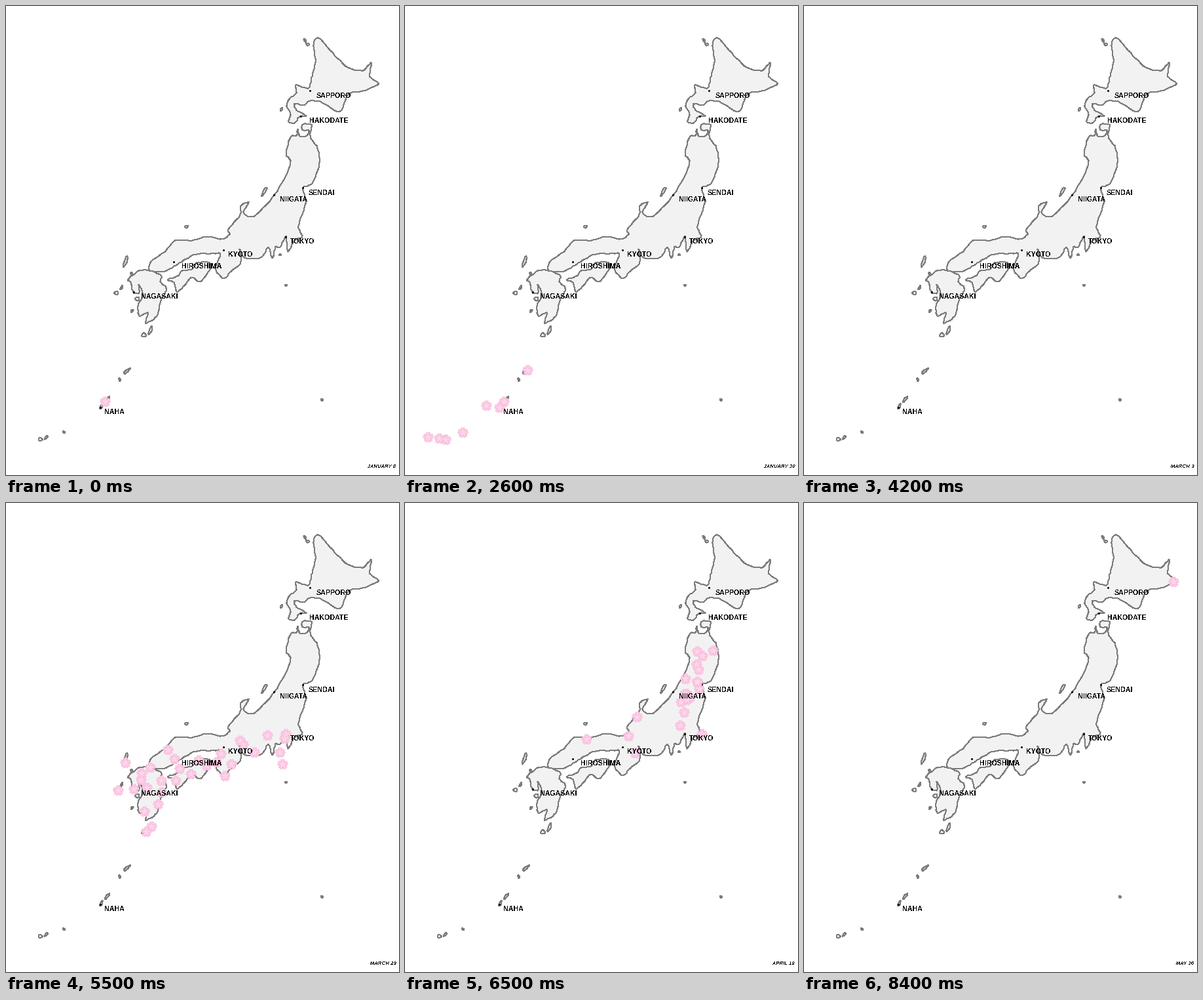
A matplotlib script for the animation above (10000 ms loop, 600 px wide and 715 px high).

```python
import numpy as np
import matplotlib.pyplot as plt
from matplotlib.animation import FuncAnimation
from matplotlib.path import Path

WIDTH, HEIGHT, DPI = 600, 715, 80
PX = 72 / DPI
LAND, COAST = "#f2f2f2", "#7c7c7c"
PETAL, PETAL_EDGE, VEIN = "#fcc8e3", "#f8b8da", "#ffeff7"
HOLD, LAST_STEP = 15, 69

# Control points of the coasts, joined by smooth curves.
HOKKAIDO = [
    (477, 48), (498, 71), (521, 93), (544, 98), (557, 86), (555, 107), (568, 118),
    (545, 129), (522, 134), (509, 161), (481, 146), (463, 144), (454, 151),
    (440, 148), (443, 158), (458, 167), (448, 168), (440, 178), (431, 176),
    (434, 164), (428, 152), (432, 141), (443, 132), (442, 120), (461, 125),
    (466, 109), (472, 84), (469, 57)]
HONSHU_EAST = [
    (452, 180), (466, 181), (464, 199), (475, 216), (478, 240), (467, 270),
    (453, 277), (457, 300), (446, 335), (452, 351), (440, 357), (430, 374),
    (427, 351), (418, 367), (411, 367), (406, 384), (400, 367), (389, 383),
    (363, 383), (356, 370), (358, 391), (343, 404), (332, 415), (319, 400),
    (327, 378), (314, 377)]
HONSHU_WEST = [
    (289, 378), (268, 389), (257, 396), (241, 404), (219, 403), (221, 389),
    (242, 374), (258, 357), (284, 357), (306, 351), (330, 355), (341, 347),
    (339, 340), (357, 318), (358, 304), (370, 299), (362, 315), (378, 320),
    (406, 292), (427, 258), (434, 236), (427, 225), (434, 199), (443, 197),
    (445, 187), (448, 198), (459, 197), (462, 189), (452, 189)]
SHIKOKU = [
    (246, 417), (262, 411), (268, 403), (283, 401), (291, 391), (309, 390),
    (312, 399), (296, 420), (283, 413), (270, 428), (260, 435), (256, 421)]
KYUSHU = [
    (186, 416), (203, 403), (220, 403), (237, 411), (235, 420), (245, 431),
    (236, 448), (230, 472), (213, 483), (216, 467), (203, 472), (201, 456),
    (209, 440), (202, 424), (203, 437), (194, 436), (190, 421)]

# centre x, centre y, length, tilt in degrees; untilted ones are round
ISLETS = [
    (456, 52, 6, 60), (460, 58, 5, 0), (420, 157, 6, -60), (394, 282, 15, -60),
    (275, 336, 5, 0), (182, 389, 18, -70), (191, 407, 3, 0), (168, 437, 6, 0),
    (176, 429, 7, -60), (220, 494, 14, -70), (210, 501, 7, 0), (192, 464, 5, -50),
    (200, 446, 7, 0), (418, 379, 3, 0), (427, 425, 3, 0), (482, 600, 4, 50),
    (184, 556, 13, -40), (173, 569, 5, 70), (145, 610, 9, -65), (154, 599, 11, -50),
    (88, 649, 4, 30), (61, 657, 7, -50), (52, 660, 6, 0)]

# name, dot, gap before the label
CITIES = [
    ("SAPPORO", 463, 128, 10), ("HAKODATE", 449, 167, 14), ("SENDAI", 452, 276, 9),
    ("NIIGATA", 408, 287, 10), ("TOKYO", 426, 351, 7), ("KYOTO", 331, 371, 8),
    ("HIROSHIMA", 255, 389, 13), ("NAGASAKI", 194, 435, 12), ("NAHA", 143, 611, 7)]

# Places by order of bloom
OKINAWA = [(150, 602), (51, 658), (123, 608), (143, 611), (61, 660), (87, 649),
           (186, 554), (34, 656)]
SOUTH = [(194, 435), (206, 411), (236, 440), (170, 437), (205, 421), (214, 433),
         (426, 351), (210, 469), (236, 422), (231, 458), (181, 395), (258, 422),
         (281, 412), (424, 358), (293, 391), (343, 397), (361, 367), (398, 353),
         (417, 379), (327, 381)]
INLAND_SEA = [(256, 389), (264, 404), (219, 402), (246, 375), (305, 399), (333, 415),
              (378, 379), (356, 361), (421, 397), (221, 492), (213, 500), (320, 394)]
CENTRE = [(332, 372), (320, 381), (290, 381), (350, 380), (333, 380), (313, 391),
          (344, 364), (340, 354), (322, 358), (311, 357), (297, 357), (276, 359),
          (268, 358), (276, 337), (345, 341), (353, 325), (368, 322), (381, 356),
          (410, 330), (419, 338), (430, 326), (443, 331), (453, 316), (452, 351),
          (429, 371), (427, 425)]


def scatter_along(start, end, spread, count, seed):
    """Places strewn around a line, ordered from its start."""
    noise = np.random.default_rng(seed).uniform(-spread, spread, (count, 2))
    return np.linspace(start, end, count) + noise


def wave(places, first, last, lag=5, fade=4):
    return [(x, y, first + i % lag, last + i % fade) for i, (x, y) in enumerate(places)]


BLOOMS = np.array(
    wave(OKINAWA, 0, 13, 9, 9)
    + wave(SOUTH, 35, 41)
    + wave(INLAND_SEA, 36, 46)
    + wave(CENTRE, 41, 47)
    + wave(scatter_along((412, 318), (456, 222), 15, 17, 4), 46, 50, 6, 6)
    + wave([(451, 199)], 54, 58)
    + wave([(450, 167), (435, 166)], 56, 59)
    + wave(scatter_along((461, 136), (505, 118), 12, 8, 2), 58, 61, 8, 6)
    + wave(scatter_along((495, 75), (538, 122), 6, 4, 3), 61, 65)
    + wave([(471, 50)], 62, 67)
    + wave([(563, 119)], 65, 69))

MONTHS = [("JANUARY", 31), ("FEBRUARY", 28), ("MARCH", 31), ("APRIL", 30), ("MAY", 31)]


def date_text(step):
    day = 8 + 2 * step
    for name, length in MONTHS:
        if day <= length:
            return f"{name} {day}"
        day -= length


def coast(points, steps=6, tension=0.4):
    """Closed cardinal spline with a slight ripple."""
    p = np.array(points, float)
    ahead = np.roll(p, -1, axis=0)
    slope = tension * (ahead - np.roll(p, 1, axis=0))
    t = (np.arange(steps) / steps)[None, :, None]
    p, q, m, n = (a[:, None] for a in (p, ahead, slope, np.roll(slope, -1, axis=0)))
    blend = 3 * t**2 - 2 * t**3
    curve = p + blend * (q - p) + (t**3 - 2 * t**2 + t) * m + (t**3 - t**2) * n
    curve = curve.reshape(-1, 2)
    k = np.arange(len(curve))
    return curve + 0.5 * np.column_stack([np.sin(2.3 * k), np.cos(1.7 * k)])


def islet(cx, cy, length, tilt):
    turn = np.linspace(0, 2 * np.pi, 9)[:-1]
    wobble = 1 + 0.2 * np.sin(5 * turn + cx)
    breadth = 2 + length / 8 if tilt else 0.8 * length
    u, v = length / 2 * wobble * np.cos(turn), breadth / 2 * wobble * np.sin(turn)
    a = np.radians(tilt)
    return np.column_stack([cx + u * np.cos(a) - v * np.sin(a),
                            cy + u * np.sin(a) + v * np.cos(a)])


def blossom():
    """Five notched petals, the first one pointing up."""
    turn = np.linspace(0, 2 * np.pi, 200, endpoint=False)
    across = (turn * 5 / (2 * np.pi) + 0.5) % 1 * 2 - 1
    radius = 3.4 + 4.6 * (1 - across ** 4) ** 0.6
    radius -= 2.2 * np.clip(1 - np.abs(across) / 0.22, 0, 1)
    points = np.column_stack([-radius * np.sin(turn), radius * np.cos(turn)])
    return Path(np.vstack([points, points[:1]]), closed=True)


def veins():
    turn = np.arange(5) * 2 * np.pi / 5
    tips = np.column_stack([-np.sin(turn), np.cos(turn)])
    points = np.stack([0.2 * tips, tips], axis=1).reshape(-1, 2)
    return Path(points, [Path.MOVETO, Path.LINETO] * 5)


fig = plt.figure(figsize=(WIDTH / DPI, HEIGHT / DPI), dpi=DPI, facecolor="white")
ax = fig.add_axes([0, 0, 1, 1])
ax.set_xlim(-0.5, WIDTH - 0.5)
ax.set_ylim(HEIGHT - 0.5, -0.5)
ax.axis("off")

mainland = [HOKKAIDO, HONSHU_EAST + HONSHU_WEST, SHIKOKU, KYUSHU]
for shape in [coast(m) for m in mainland] + [islet(*i) for i in ISLETS]:
    ax.add_patch(plt.Polygon(shape, facecolor=LAND, edgecolor=COAST,
                             linewidth=PX, antialiased=False))

for name, x, y, gap in CITIES:
    ax.plot(x, y, "o", color="black", markersize=3 * PX, markeredgewidth=0)
    ax.text(x + gap, y + 11, name, family="Liberation Sans", weight="bold",
            size=10.6 * PX, va="baseline", antialiased=False)

petals, = ax.plot([], [], linestyle="none", marker=blossom(), markersize=16 * PX,
                  color=PETAL, markeredgecolor=PETAL_EDGE, markeredgewidth=0.5 * PX)
stamens, = ax.plot([], [], linestyle="none", marker=veins(), markersize=8 * PX,
                   markeredgecolor=VEIN, markeredgewidth=0.9 * PX)
date = ax.text(595, 704, "", family="Liberation Sans", style="italic",
               size=7.9 * PX, ha="right", va="baseline", antialiased=False)


def draw(frame):
    step = min(max(frame - HOLD, 0), LAST_STEP)
    x, y, first, last = BLOOMS.T
    shown = (first <= step) & (step <= last)
    for layer in (petals, stamens):
        layer.set_data(x[shown], y[shown])
    date.set_text(date_text(step))
    return petals, stamens, date


anim = FuncAnimation(fig, draw, frames=100, interval=100, repeat=True,
                     repeat_delay=0, blit=False)
plt.show()
```
